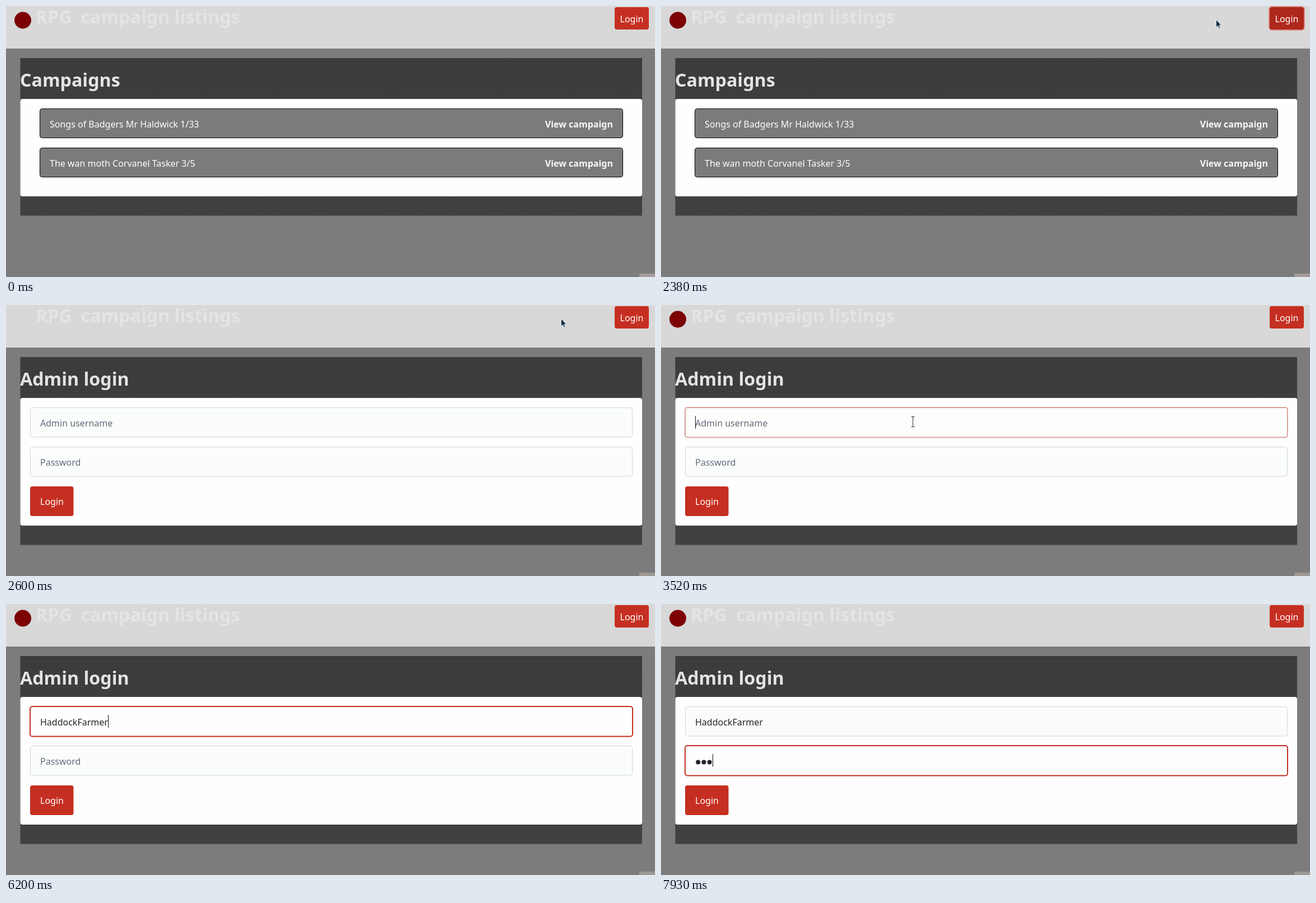
Animation of 1158x484 px, one loop 8000 ms. Source, as an HTML page:

```html
<!DOCTYPE html>
<html lang="en">
<head>
<meta charset="utf-8">
<title>Campaign listings</title>
<style>
  html, body { margin: 0; width: 100%; height: 100%; overflow: hidden; background: #7c7c7c; }
  svg { display: block; width: 100vw; height: 100vh; }
  text { font: 16px "Noto Sans", "Open Sans", sans-serif; fill: #fff; white-space: pre; }
  .head { font-size: 32.2px; font-weight: 700; fill: #e4e4e4; }
  .bold { font-weight: 700; fill: #f8f8f8; }
  .hint { fill: #646b79; }
  .typed { fill: #22242b; }
</style>
</head>
<body>
<svg viewBox="0 0 1158 484" preserveAspectRatio="none">
  <defs>
    <linearGradient id="shade" x1="0" y1="0" x2="0" y2="1">
      <stop offset="0" stop-color="#3c3c3c"/>
      <stop offset="1" stop-color="#3f4142"/>
    </linearGradient>
  </defs>
  <g id="page">
    <rect width="1158" height="484" fill="#7c7c7c"/>
    <rect width="1158" height="76" fill="#d8d8d8"/>
    <circle id="logo" cx="30" cy="25.5" r="15" fill="#7c0203"/>
    <text class="head" y="31"><tspan x="53">RPG</tspan><tspan x="133.5">campaign listings</tspan></text>
    <rect id="ring" x="1085" y="1" width="63" height="42" rx="5" fill="none" stroke="#dd8f88" stroke-width="2"/>
    <rect id="topButton" x="1086" y="2" width="61" height="40" rx="4"/>
    <text x="1116.5" y="29" text-anchor="middle">Login</text>
    <rect id="corner" x="1130" y="478" width="28" height="6"/>
    <rect id="card" x="25.5" y="93" width="1109.5" fill="url(#shade)"/>
    <text id="heading" class="head" x="25" y="143.5"></text>
    <rect id="panel" x="25.5" y="166" width="1109.5" rx="4" fill="#fefefe"/>
    <g id="list"></g>
    <g id="form">
      <rect x="43" y="324" width="77.5" height="53" rx="4" fill="#c52f21"/>
      <text x="82" y="357" text-anchor="middle">Login</text>
    </g>
  </g>
  <g id="blank">
    <rect width="1158" height="484" fill="#2c2a33"/>
    <rect y="482" width="1158" height="2" fill="#26242d"/>
  </g>
  <path id="arrow" d="M.5 .5V14L3.6 11.2L5.6 15.6L7.8 14.6L5.9 10.3H9.6Z" fill="#10283a" stroke="#d3e0e6"/>
  <path id="hand" d="M5 1.5q1.5-1.5 2.6 0V7l6 1.4q1.8.5 1.6 2.4L14 18H6L1 11.5q.6-2 2.4-.8L5 12Z" fill="#fff" stroke="#111"/>
  <path id="beam" d="M-3 -9.5H3M0 -9.5V8.5M-3 8.5H3" fill="none" stroke="#333"/>
</svg>
<script>
const LOOP = 8000, STEP = 70;
const RED = [197, 47, 33], DEEP = [174, 40, 28];
const $ = id => document.getElementById(id);
const show = (el, on) => el.setAttribute("display", on ? "inline" : "none");
const clamp = v => Math.max(0, Math.min(1, v));
const ramp = (t, from, to) => clamp((t - from) / (to - from));
const lerp = (a, b, k) => a + (b - a) * k;
const mix = (a, b, k) => `rgb(${a.map((v, i) => Math.round(lerp(v, b[i], k)))})`;
const moveTo = (el, x, y) => el.setAttribute("transform", `translate(${x.toFixed(1)} ${y.toFixed(1)})`);

function add(parent, tag, attrs, text = "") {
  const el = document.createElementNS("http://www.w3.org/2000/svg", tag);
  for (const key in attrs) el.setAttribute(key, attrs[key]);
  el.textContent = text;
  return parent.appendChild(el);
}

function addRow(y, label) {
  const list = $("list");
  add(list, "rect", { x: 60.5, y: y + .5, width: 1040, height: 52, rx: 4, fill: "#7b7b7b", stroke: "#000" });
  add(list, "text", { x: 78, y: y + 34 }, label);
  add(list, "text", { x: 1083, y: y + 34, "text-anchor": "end", class: "bold" }, "View campaign");
}
addRow(183, "Songs of Badgers Mr Haldwick 1/33");
addRow(253, "The wan moth Corvanel Tasker 3/5");

function makeField(y, hint) {
  const form = $("form");
  return {
    y,
    box: add(form, "rect", { x: 43.5, y: y + .5, width: 1074, height: 52.5, rx: 4 }),
    focus: add(form, "rect", { x: 43, y, width: 1075, height: 53.5, rx: 4, fill: "#fefefe", stroke: "#c52f21", "stroke-width": 2 }),
    hint: add(form, "text", { x: 61, y: y + 34, class: "hint" }, hint),
    value: add(form, "text", { x: 61, y: y + 34, class: "typed" })
  };
}
const user = makeField(183, "Admin username");
const pass = makeField(253, "Password");
const dots = [0, 1, 2].map(i => add($("form"), "circle", { cx: 66.2 + i * 10.2, cy: 282.5, r: 4, fill: "#22242b" }));
const caret = add($("form"), "rect", { width: 1, height: 23, fill: "#111" });

const NAME = "HaddockFarmer";
const NAME_TIMES = [4120, 4450, 4650, 4730, 4800, 4870, 5060, 5590, 5740, 5860, 5990, 6200, 6200];
const PASS_TIMES = [7190, 7730, 7930];
const typedCount = (times, t) => times.filter(at => t >= at).length;

function paintField(field, focus, filled) {
  field.box.setAttribute("fill", filled ? "#fbfbfb" : "#fbfdfc");
  field.box.setAttribute("stroke", filled ? "#d5d5d5" : "#cfd5df");
  field.focus.setAttribute("opacity", focus);
  show(field.hint, !filled);
}

function paintForm(t) {
  const count = typedCount(NAME_TIMES, t), secret = typedCount(PASS_TIMES, t);
  const onPass = t >= 6660;
  user.value.textContent = NAME.slice(0, count);
  paintField(user, onPass ? 0 : ramp(t, 3440, 3650), count > 0);
  paintField(pass, onPass ? 1 : 0, secret > 0);
  dots.forEach((dot, i) => show(dot, i < secret));
  show(caret, t >= 3510);
  const offset = onPass ? secret * 10.2 : count && user.value.getComputedTextLength();
  caret.setAttribute("x", Math.round(61 + offset));
  caret.setAttribute("y", onPass ? 268 : 198);
}

// Pointer shape and position; null while hidden.
function pointerAt(t) {
  if (t < 420 || t >= 4120) return null;
  const held = 420 + Math.floor((t - 420) / STEP) * STEP;
  if (t < 1180) {
    const k = 1 - (1 - ramp(held, 350, 1180)) ** 2, j = 1 - k;
    const x = j * j * 1112 + 2 * j * k * 1066 + k * k * 1087;
    const y = lerp(490, 19, k);
    return [y < 42 ? "hand" : "arrow", x, y];
  }
  if (t < 1650) return ["hand", 1087, 18];
  if (t < 2310) return ["arrow", 1087, 19];
  if (t < 2380) return ["arrow", 1030, 22];
  if (t < 2650) return ["arrow", 990, 24];
  const p = ramp(held, 2590, 3300), k = p * p * (3 - 2 * p);
  const x = lerp(990, 449.5, k), y = lerp(24, 209, k);
  return [y > 183 ? "beam" : "arrow", x, y];
}

function draw(t) {
  const login = t >= 2600;
  show($("blank"), t >= 2510 && t < 2600);
  show($("list"), !login);
  show($("form"), login);
  show($("logo"), t < 2510 || t >= 3180);
  $("heading").textContent = login ? "Admin login" : "Campaigns";
  $("card").setAttribute("height", login ? 335.5 : 281.5);
  $("panel").setAttribute("height", login ? 228 : 174);
  $("corner").setAttribute("fill", login ? "#9d9892" : "#a59b9b");
  $("topButton").setAttribute("fill", mix(RED, DEEP, login ? 0 : ramp(t, 960, 1180)));
  $("ring").setAttribute("opacity", login ? 0 : ramp(t, 1260, 1400));
  if (login) paintForm(t);

  const pointer = pointerAt(t);
  for (const shape of ["arrow", "hand", "beam"]) {
    const on = pointer !== null && pointer[0] === shape;
    show($(shape), on);
    if (on) moveTo($(shape), pointer[1], pointer[2]);
  }
}

function tick() {
  draw(performance.now() % LOOP);
  requestAnimationFrame(tick);
}
tick();
</script>
</body>
</html>
```
